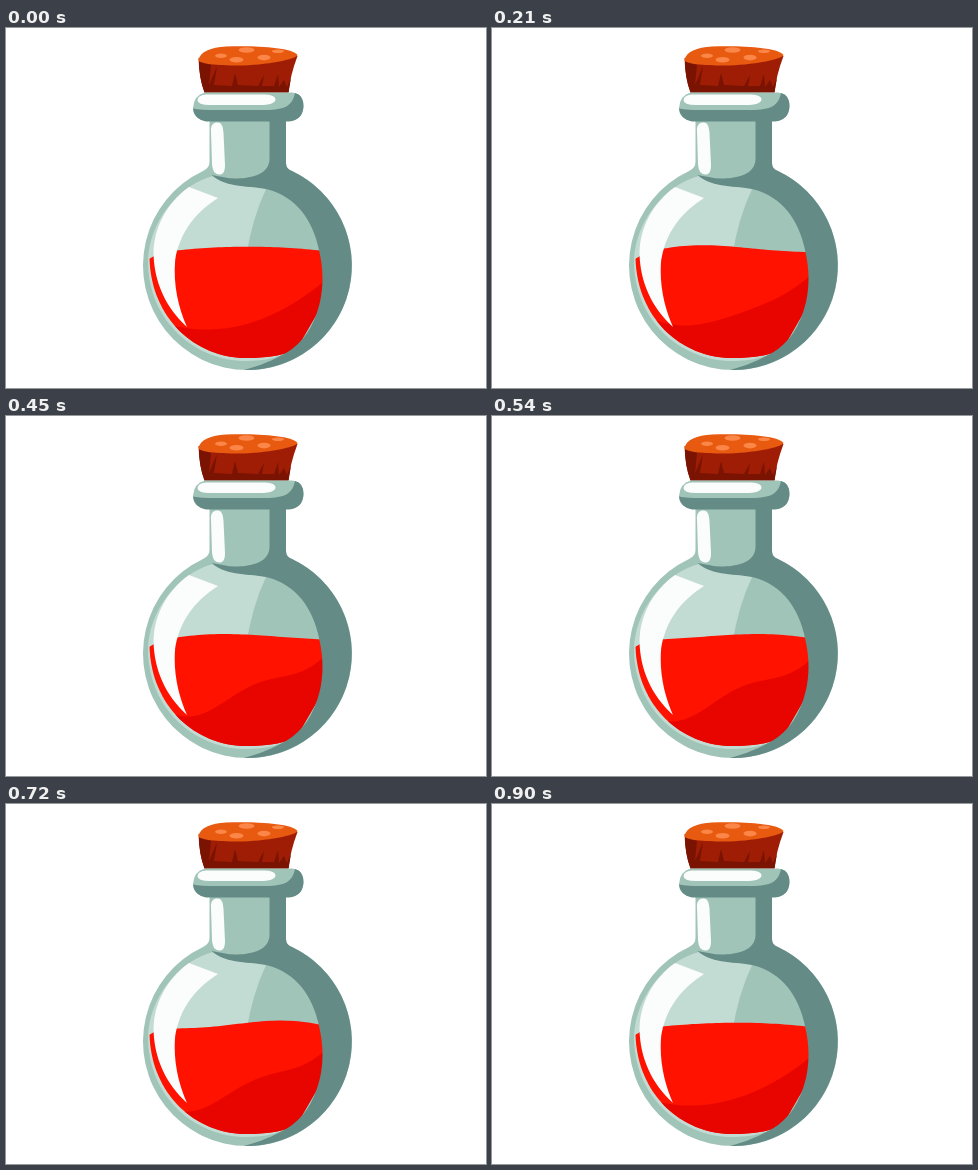
Write an HTML page that moves like this. It is 480 px wide and 360 px high and loops after 0.93 s.

```html
<!DOCTYPE html>
<html lang="en">
<head>
<meta charset="utf-8">
<title>Potion</title>
<style>
html, body { margin: 0; width: 100%; height: 100%; overflow: hidden; background: #fff; }
svg { display: block; width: 480px; height: 360px; }
</style>
</head>
<body>
<svg viewBox="0 0 480 360">
  <defs>
    <clipPath id="belly">
      <path d="M143.500 230C145 291 190 330 240 330C260 330 274 328 290 322L320 270V190H143.500Z"/>
    </clipPath>
  </defs>

  <!-- cork -->
  <path fill="#a01d05" d="M192.500 30Q193 50 198.500 64.500H282.500Q284 48 291.500 28Z"/>
  <path fill="#7a1302" d="M193 32Q193 50 198.500 64.500H282.500L285 50L281 59L278 52L273 59L272 46L268 58H256L258 47L252 58L232 57L229 45L226 58L208 57L211 38L203 57L205 37Z"/>
  <path fill="#e75a10" d="M192.500 32C194 24 205 19 220 18.500C246 17.500 286 19 291.500 27C291 31 260 37.500 232 37.500C212 37.500 193 36 192.500 32Z"/>
  <g fill="#fb8648">
    <ellipse cx="240.500" cy="22" rx="8" ry="2.800"/>
    <ellipse cx="215" cy="27.700" rx="6" ry="2.200"/>
    <ellipse cx="230.500" cy="31.800" rx="7" ry="2.800"/>
    <ellipse cx="258" cy="29.600" rx="6.500" ry="2.800"/>
    <ellipse cx="272" cy="23.300" rx="6" ry="1.800"/>
  </g>

  <!-- bulb and neck -->
  <path fill="#a1c4b9" d="M203.500 90V134Q203.500 140 197 143A104.500 104.500 0 1 0 286 143Q280 141 280 135V90Z"/>
  <path fill="#c3dcd3" d="M207 148C172 157 142 195 142 235C143 294 190 333 240 333C260 333 274 329 284 323L315 250L313 222C305 185 285 165 261 161Z"/>
  <path fill="#a1c4b9" d="M260.500 160Q246 190 240 230H318C310 185 290 165 260.500 160Z"/>

  <g clip-path="url(#belly)">
    <path id="liquid" fill="#ff1200"/>
    <path id="shade" fill="#e80500"/>
  </g>

  <path fill="#648b86" d="M263.500 90V131C263.500 146 246 150 232 150.500C222 151 213 148 205.500 147C222 161 244 157 262 161.500C290 169 307 192 313 222C318 243 317 260 314 274C308 299 297 315 280 325C267 332 254 338 238 341.900A104.500 104.500 0 0 0 286 143Q280 141 280 135V90Z"/>
  <path fill="#fbfcfc" d="M183 159L212 170C188 185 173 207 169.200 232C167 257 172.500 280 181 299C160 280 148 254 147.500 225C148 199 161 175 183 159Z"/>
  <path fill="#fbfcfc" d="M205 104C204.500 97 207 94.500 211.500 94.500C216 94.500 217 99 217.500 105L219 137C219 144 217 146.500 213.500 146.500C209 146.500 206.500 143 206 136Z"/>

  <!-- lip -->
  <path fill="#a1c4b9" d="M199 64.500H286Q297.500 66 297.500 78Q297 92 283 93H200Q187 91 187 80Q188 67 199 64.500Z"/>
  <path fill="#648b86" d="M187 80.500Q195 82 210 82H256C276 82 286 80 289 65Q297.500 67 297.500 78Q297 92 283 93.500H200Q188 91 187 80.500Z"/>
  <path fill="#fbfcfc" d="M200 66.500H259Q269.500 67 269.500 71.500Q269 77 253 77H204Q191.500 77 191.500 72Q192 67 200 66.500Z"/>
</svg>
<script>
const LOOP = 930, STEP = 30;
const { sin, PI } = Math;

// Smooth rise from 0 to 1 between two times.
function ease(t, from, to) {
  const u = Math.min(1, Math.max(0, (t - from) / (to - from)));
  return u * u * (3 - 2 * u);
}

// The surface tips left, then right, then settles.
const swing = t => ease(t, 0, 330) - 2 * ease(t, 330, 660) + ease(t, 660, LOOP);
// The darker part swells and sinks back.
const swell = t => ease(t, 90, 450) - ease(t, 660, LOOP);

function surfaceY(x, s) {
  const u = (x - 242) / 72;
  return 218.7 + 3.8 * u * u + 3.7 * s * sin(2.5 * u);
}

function shadeY(x, s, w) {
  const u = (x - 180) / 136;
  const rest = 300 + 20 * u - 65 * u * u;
  const hump = w * (19 * sin(PI * u) ** 2 + 11 * u);
  const tilt = (3 * w - 6 * s) * (1 - u) ** 2 - 4 * s * u;
  return rest - hump + tilt;
}

// Area below a curve.
function area(from, to, y, lead = "") {
  let d = "M130 345" + lead;
  for (let x = from; x <= to; x += 4) d += `L${x} ${y(x).toFixed(2)}`;
  return d + "V345Z";
}

const liquid = document.getElementById("liquid");
const shade = document.getElementById("shade");

function draw(ms) {
  const t = Math.floor((ms % LOOP) / STEP) * STEP;
  const s = swing(t), w = swell(t);
  liquid.setAttribute("d", area(164, 320, x => surfaceY(x, s), "L142 231.5L149 227.5"));
  shade.setAttribute("d", area(160, 320, x => shadeY(x, s, w)));
}

const start = performance.now();
function tick(now) {
  draw(Math.max(0, now - start));
  requestAnimationFrame(tick);
}
draw(0);
requestAnimationFrame(tick);
</script>
</body>
</html>
```
